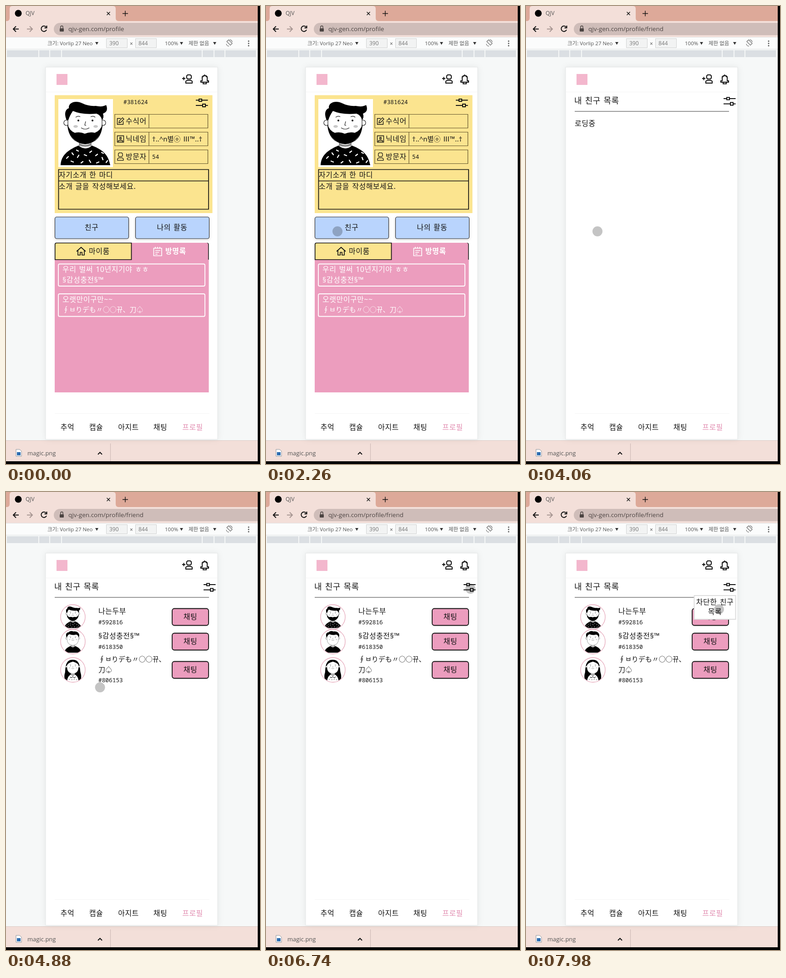
Write an HTML page that moves like this. It is 558x1004 px and loops after 8 s.

```html
<!DOCTYPE html>
<html lang="ko">
<head>
<meta charset="utf-8">
<style>
  html, body { margin: 0; width: 100%; height: 100%; overflow: hidden; background: #000; }
  svg { display: block; width: 100vw; height: 100vh; }
  text { font: 500 16px "Noto Sans", "Noto Sans CJK KR", "Noto Sans CJK", sans-serif; letter-spacing: .5px; word-spacing: 1.5px; fill: #151515; white-space: pre; }
  .ui { font: 12px "Open Sans", "Noto Sans CJK KR", sans-serif; letter-spacing: 0; word-spacing: 0; fill: #555; }
  .id { font: 500 12.8px "Noto Sans Mono", monospace; letter-spacing: 0; }
  .odd { font-size: 15px; letter-spacing: 0; }
  .mid { text-anchor: middle; }
  .white { fill: #fff; }
  .line { fill: none; stroke: #111; stroke-width: 2; }
  .fine { stroke-width: 1.4; }
  .thin { fill: none; stroke: #62542c; stroke-width: 1.2; }
  .soft { filter: drop-shadow(0 2px 3px #0002); }
</style>
</head>
<body>
<svg viewBox="0 0 558 1004" preserveAspectRatio="none">
  <defs>
    <path id="sliders" class="line" d="M0 3.500h7m6 0h13.500M0 15h15m6 0h5.500M7 1h6v5H7zM15 12h6v6h-6z"/>
    <path id="person" d="M5 1h6l2 2v5l-2 2H5L3 8V3zM1 19v-4l3-2h8l3 2v4z"/>
    <clipPath id="disc"><circle cx="59.500" cy="73.500" r="77"/></clipPath>

    <g id="face">
      <path d="M46 84v20q14 9 26 0V84" fill="#fff" stroke="#222"/>
      <path d="M46 96q13 9 26 0v6q-13 5-26 0z" fill="#888"/>
      <g fill="#fff" stroke="#222" stroke-width="1.200">
        <circle cx="18" cy="52" r="6"/><circle cx="98" cy="52" r="6"/>
        <path d="M21 30V55Q22 96 59 97Q95 96 96 55V30Q58 8 21 30z"/>
      </g>
      <g fill="#c9c9c9"><ellipse cx="38" cy="60" rx="5" ry="3"/><ellipse cx="82" cy="60" rx="5" ry="3"/></g>
      <circle cx="44" cy="47" r="2"/><circle cx="75" cy="47" r="2"/>
      <path d="M38 40q6-4 10-1M71 39q6-3 10 1M60 49l-2 8 3 1M50 63q9 6 18 0" fill="none" stroke="#222" stroke-width="1.200"/>
    </g>
    <g id="man">
      <path d="M5 145C6 124 20 112 44 102Q59 112 74 102C100 112 110 124 114 145z"/>
      <use href="#face"/>
      <path d="M18 46C13 34 14 23 23 20C22 6 40 3 52 9Q66 16 82 15Q97 18 105 13Q111 27 98 32Q101 40 96 46Q93 35 84 32Q52 35 32 26Q25 36 22 46z"/>
      <path d="M20 55Q24 69 36 74Q48 71 58 76Q70 71 80 74Q93 69 97 55Q97 74 84 87Q72 99 59 99Q46 99 33 87Q20 74 20 55z"/>
      <path d="M18 130l4-4M30 118l3 4M28 136l5 2M42 128l3-5M40 112l4 2M50 140l4-3M57 122l5 2M68 134l3 5M73 114l-4 3M82 124l4-3M84 140l5-2M96 128l2 5M95 117l4 2M105 139l3-4" fill="none" stroke="#fff" stroke-width="2.300" stroke-linecap="round"/>
    </g>
    <g id="youth">
      <path d="M5 145C6 124 20 112 44 102Q59 118 74 102C100 112 110 124 114 145z"/>
      <use href="#face"/>
      <path d="M20 48C10 30 16 15 30 14Q44 0 62 8Q90 4 99 25Q103 36 96 46Q92 30 80 28Q60 34 36 26Q24 33 20 48z"/>
    </g>
    <g id="woman">
      <path d="M58 8C10 6 12 60 9 88Q0 115 8 138Q58 148 110 138Q117 115 108 88C104 60 106 6 58 8z"/>
      <path d="M22 145Q24 114 46 104Q59 118 72 104Q94 114 96 145z" fill="#fff"/>
      <use href="#face"/>
      <path d="M18 50Q16 14 58 11Q102 14 99 50Q92 28 59 20Q26 28 18 50z"/>
      <path d="M40 117l7 8 11-8 12 8 7-8M34 134h5m11 3h5m10-3h5m10 3h5" fill="none" stroke="#222" stroke-width="3"/>
    </g>
  </defs>

  <!-- browser -->
  <path d="M0 0h558v1004H0z" fill="#f6f8f8"/>
  <path d="M0 0h558v34H0z" fill="#dda999"/>
  <path d="M0 33h2q6 0 6-7V6q0-6 6-6h221q6 0 6 6v20q0 7 6 7h311v35H0z" fill="#f3dfd9"/>
  <circle cx="27" cy="16" r="7.500"/>
  <text class="ui" x="43" y="20">QJV</text>
  <path d="M221.500 13l7 7m0-7l-7 7M256 16.500h12m-6-6v12" class="line fine"/>
  <path d="M28 50.500H16m6-6l-6 6 6 6" class="line"/>
  <path d="M46 50.500h12m-6-6l6 6-6 6" class="line" style="stroke:#a69591"/>
  <path d="M88 46a6 6 0 1 0 1 6M89.500 43v5h-5" class="line"/>
  <rect x="105" y="37" width="470" height="27" rx="13.500" fill="#cfbdb9"/>
  <rect x="118" y="49" width="9" height="7" rx="1" fill="#4b4442"/>
  <path d="M120 49v-3a2.500 2.500 0 0 1 5 0v3" fill="none" stroke="#4b4442" stroke-width="1.500"/>
  <text id="url" class="ui" x="137" y="55" style="font-size:13.500px;fill:#4e4644"></text>

  <path d="M0 68h558v27H0z" fill="#fbfcfc"/>
  <path d="M0 68.500h558M0 94.500h558" stroke="#e3e5e6"/>
  <g fill="#f2f3f3" stroke="#d0d2d2"><path d="M220.500 71.500h46v20h-46zM284.500 71.500h46v20h-46z"/></g>
  <text class="ui" x="91" y="86" style="font-size:11.500px">크기: Vorlip 27 Neo</text>
  <text class="ui" x="227" y="86" style="fill:#777">390</text>
  <text class="ui" x="272" y="87">×</text>
  <text class="ui" x="291" y="86" style="fill:#777">844</text>
  <text class="ui" x="349" y="86" style="font-size:11.500px">100%</text>
  <text class="ui" x="401" y="86" style="font-size:11.500px">제한 없음</text>
  <path d="M196 79h7l-3.500 6zM382 79h7l-3.500 6zM455 79h7l-3.500 6z" fill="#333"/>
  <path d="M486 77l3-3 8 8-4 4-8-8zM484 83q1 5 6 5M491 74q5 0 6 5" fill="none" stroke="#666" stroke-width="1.200"/>
  <g fill="#555"><circle cx="533" cy="77" r="1.500"/><circle cx="533" cy="82" r="1.500"/><circle cx="533" cy="87" r="1.500"/></g>
  <path d="M2 97h69v15H2zM73 97h22v15H73zM97 97h24v15H97zM123 97h307v15H123zM432 97h24v15h-24zM458 97h22v15h-22zM482 97h67v15h-67z" fill="#dbdfe3"/>

  <path d="M0 952h558v46H0z" fill="#f3dfd9"/>
  <path d="M0 952.500h558" stroke="#dccbc6"/>
  <path d="M22 972h8l4 4v11H22z" fill="#fff" stroke="#8a9199"/>
  <path d="M24 978h8v7h-8z" fill="#2b6cb0"/>
  <text class="ui" x="47" y="985" style="font-size:13px">magic.png</text>
  <path d="M202 983l4.500-4.500 4.500 4.500" class="line"/>
  <path d="M229.500 959v39" stroke="#c9b6b1"/>

  <!-- phone -->
  <path d="M87 134h378v816H87z" fill="#fff" stroke="#e2e5e5" style="filter:drop-shadow(0 0 7px #0001)"/>
  <path d="M88 188.500h376M107 893.500h340" stroke="#f5f5f5"/>
  <rect x="111" y="149" width="24" height="24" fill="#f3b7cd"/>
  <use href="#person" class="line" x="394" y="150"/>
  <path d="M387 159h7m-3.500-3.500v7" class="line"/>
  <path d="M431 164v-9h2v-2h7v2h2v9h3v3h-17v-3zM436.500 153v-3M433 167v3.500h7V167" class="line"/>
  <g class="mid" id="nav"></g>

  <g id="profile">
    <path d="M107 195.500h346.500V454H107z" fill="#fbe48f"/>
    <path d="M115 204h120v149H115z" fill="#fff"/>
    <use href="#man" x="115" y="204"/>
    <text class="id" x="258" y="215">#381624</text>
    <use href="#sliders" x="417" y="203"/>
    <path class="thin" d="M239 237.500h204.500v30H239zM239 276.500h204.500v30H239zM239 315.500h204.500v30H239zM314 237.500v30m0 9v30m0 9v30"/>
    <path class="line fine" d="M252 246.500h-7.500v13h13v-7M248 256l1-4 7-7 3 3-7 7zM244.500 284.500h14v14h-14zM250 288h3v4h-3zM247 298v-3h9v3"/>
    <use href="#person" class="line fine" transform="translate(244 321) scale(.92)"/>
    <text x="263" y="258">수식어</text>
    <text x="263" y="297">닉네임</text>
    <text x="263" y="336">방문자</text>
    <text x="321" y="297" class="odd">†..^n별ⓞ Ⅲ™..†</text>
    <text x="321" y="335" class="id">54</text>
    <path class="line" style="stroke-width:1.700" d="M115.500 358.500h329.500v87H115.500zM115 383.500h330"/>
    <text x="116" y="376">자기소개 한 마디</text>
    <text x="116" y="401">소개 글을 작성해보세요.</text>
    <g class="soft" fill="#b9d4fd" stroke="#333" stroke-width="1.200">
      <rect x="107.500" y="462.500" width="162" height="47.500" rx="4"/><rect x="284.500" y="462.500" width="162" height="47.500" rx="4"/>
    </g>
    <text class="mid" x="188" y="491">친구</text>
    <text class="mid" x="365" y="491">나의 활동</text>
    <rect x="260" y="519" width="185.500" height="40" rx="4" fill="#111"/>
    <path d="M276 519h164q4 0 4 4v33h1.500v291H107V556h169z" fill="#ec9dbe"/>
    <path d="M111 519.500h164.500V556H107.700V523q0-3.500 3.300-3.500z" fill="#fbe48f" stroke="#111" stroke-width="1.700"/>
    <path class="line" style="stroke-width:1.700" d="M155 538l10-9 10 9m-17-2v10h5v-6h4v6h5v-10"/>
    <text x="182" y="543">마이룸</text>
    <path class="line" style="stroke:#fff;stroke-width:1.700" d="M324.500 531h17.500v16.500h-17.500zM328 528v4m5-4v4m5-4v4M328 536h11m-11 4h8m-8 4h5"/>
    <text class="white" x="350" y="543" style="font-weight:700">방명록</text>
    <g fill="none" stroke="#fff" stroke-width="1.800"><rect x="115" y="565.500" width="322" height="48.500" rx="3"/><rect x="115" y="631" width="322" height="49.500" rx="3"/></g>
    <text class="white" x="124" y="583">우리 벌써 10년지기야 ㅎㅎ</text>
    <text class="white" x="124" y="606">§감성충전§™</text>
    <text class="white" x="124" y="649">오랫만이구만~~</text>
    <text class="white odd" x="124" y="671">∮ㅂりデも〃○○뀨、刀♤</text>
  </g>

  <g id="friends">
    <text x="106" y="214" style="font-size:18px">내 친구 목록</text>
    <use href="#sliders" x="434" y="199.500"/>
    <path d="M107 231h339" stroke="#333" stroke-width="1.200"/>
    <text id="loading" x="107" y="263">로딩중</text>
    <g id="list"></g>
    <g id="menu">
      <path d="M369.500 227h91v52h-91z" fill="#fff" stroke="#ddd" stroke-width="2"/>
      <text class="mid" x="415" y="247">차단한 친구</text>
      <text class="mid" x="415" y="268">목록</text>
    </g>
  </g>

  <circle id="pointer" r="11" fill-opacity=".23"/>
  <path d="M553 0h5v1004H0v-6h553z"/>
</svg>

<script>
  const el = id => document.getElementById(id);
  const show = (id, on) => el(id).style.display = on ? '' : 'none';

  el('nav').innerHTML = [['추억', 135], ['캡슐', 198], ['아지트', 269], ['채팅', 339], ['프로필', 410]]
    .map(([name, x]) => `<text x="${x}" y="929"${name === '프로필' ? ' style="fill:#e28fb2"' : ''}>${name}</text>`).join('');

  const friend = (y, look, lines, id) => `
    <circle cx="147" cy="${y}" r="27" fill="#fff" stroke="#e6a9bb" stroke-width="1.300"/>
    <use href="#${look}" clip-path="url(#disc)" transform="translate(126.800 ${y - 25}) scale(.34)"/>
    ${lines.map((s, i) => `<text x="203" y="${y - 7 + 23 * (i - (lines.length - 1) / 2)}"${lines[1] ? ' class="odd"' : ''}>${s}</text>`).join('')}
    <text class="id" x="203" y="${y + 4 + 11.5 * lines.length}">${id}</text>
    <rect x="365" y="${y - 18.5}" width="80" height="37" rx="5" fill="#ec9dbe" stroke="#111" stroke-width="1.800"/>
    <text class="mid" x="405" y="${y + 5}">채팅</text>`;
  el('list').innerHTML =
    friend(274, 'man', ['나는두부'], '#592816') +
    friend(328, 'youth', ['§감성충전§™'], '#618350') +
    friend(390, 'woman', ['∮ㅂりデも〃○○뀨、', '刀♤'], '#806153');

  // time, x, y
  const path = [
    [0, 540, 1016], [300, 540, 1016], [840, 503, 662], [1420, 165, 464], [1700, 157, 494],
    [4600, 157, 494], [5500, 371, 210], [5950, 371, 210], [6500, 449, 212],
    [7200, 449, 212], [7600, 430, 276], [7980, 424, 257], [8000, 424, 257]
  ];

  function pointerAt(t) {
    const i = path.findIndex(k => k[0] > t);
    const [t0, x0, y0] = path[i - 1], [t1, x1, y1] = path[i];
    const u = (t - t0) / (t1 - t0), s = u * u * (3 - 2 * u);
    return [x0 + (x1 - x0) * s, y0 + (y1 - y0) * s];
  }

  function draw() {
    const t = performance.now() % 8000;
    const friendsPage = t >= 3700, loaded = t >= 4320;
    show('profile', !friendsPage);
    show('friends', friendsPage);
    show('loading', !loaded);
    show('list', loaded);
    show('menu', t >= 7100);
    el('url').textContent = 'qjv-gen.com/profile' + (friendsPage ? '/friend' : '');
    el('pointer').setAttribute('transform', `translate(${pointerAt(t)})`);
    requestAnimationFrame(draw);
  }
  draw();
</script>
</body>
</html>
```
